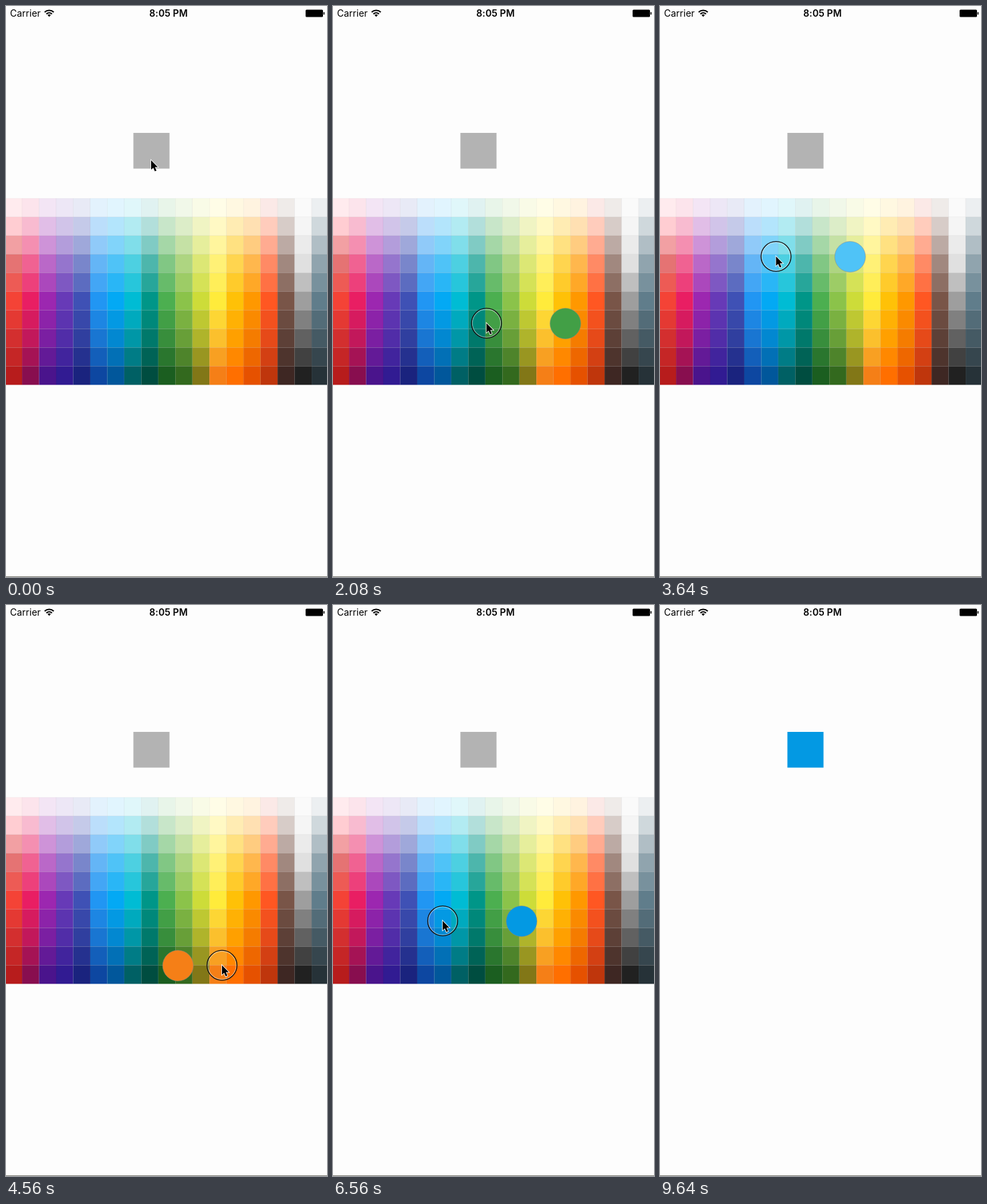
An HTML page for the animation above (9.76 s loop, 480x855 px).

```html
<!DOCTYPE html>
<html lang="en">
<head>
<meta charset="utf-8">
<title>Color picker</title>
<style>
  html, body { margin: 0; width: 100%; height: 100%; overflow: hidden; background: #fdfdfd; }
  svg { display: block; width: 100vw; height: 100vh; }
  text { font: 14px Inter, "Liberation Sans", sans-serif; }
  .clock { font-weight: 600; letter-spacing: .1px; }
</style>
</head>
<body>
<svg viewBox="0 0 480 855">
  <rect width="480" height="855" fill="#fdfdfd"/>
  <rect y="854" width="480" height="1" fill="#808078"/>
  <text x="6" y="16">Carrier</text>
  <text x="243" y="16" text-anchor="middle" class="clock">8:05 PM</text>
  <g fill="none" stroke="#000" stroke-width="2">
    <path d="M57.8 9.2a10 10 0 0 1 13.6 0M60.4 12a6.2 6.2 0 0 1 8.4 0"/>
    <path d="M64.6 16.2l-2.4-2.6a3.6 3.6 0 0 1 4.8 0z" fill="#000" stroke="none"/>
  </g>
  <rect x="448" y="5.5" width="26" height="11" rx="1.5"/>
  <rect x="474.7" y="9" width="1.6" height="4" rx=".8"/>
  <rect id="swatch" x="190.5" y="190" width="54" height="53.5"/>
  <g id="picker">
    <g id="cells" stroke="#000" stroke-opacity=".05" stroke-width=".6"></g>
    <g id="ring" fill="none">
      <circle r="21.2" stroke="#fff" stroke-opacity=".5" stroke-width="1.2"/>
      <circle r="22.4" stroke="#111" stroke-width="1.4"/>
    </g>
    <circle id="preview" r="23" stroke="#888" stroke-opacity=".5" stroke-width="1"/>
  </g>
  <path id="cursor" d="M0 0V14L3.2 11.2L5.6 16.6L8 15.6L5.7 10.2H10Z" stroke="#fff" stroke-width="1.6" paint-order="stroke"/>
</svg>
<script>
const LOOP = 9760;
const GRID = { x: -1.4, y: 288, w: 25.47, h: 27.93, rows: 10 };
const STOP_ROWS = [0, 1, 3, 5, 7, 9];
// Material hues, one column per line: shades 50, 100, 300, 500, 700, 900.
const COLUMNS = `
ffebee ffcdd2 e57373 f44336 d32f2f b71c1c
fce4ec f8bbd0 f06292 e91e63 c2185b 880e4f
f3e5f5 e1bee7 ba68c8 9c27b0 7b1fa2 4a148c
ede7f6 d1c4e9 9575cd 673ab7 512da8 311b92
e8eaf6 c5cae9 7986cb 3f51b5 303f9f 1a237e
e3f2fd bbdefb 64b5f6 2196f3 1976d2 0d47a1
e1f5fe b3e5fc 4fc3f7 03a9f4 0288d1 01579b
e0f7fa b2ebf2 4dd0e1 00bcd4 0097a7 006064
e0f2f1 b2dfdb 4db6ac 009688 00796b 004d40
e8f5e9 c8e6c9 81c784 4caf50 388e3c 1b5e20
f1f8e9 dcedc8 aed581 8bc34a 689f38 33691e
f9fbe7 f0f4c3 dce775 cddc39 afb42b 827717
fffde7 fff9c4 fff176 ffeb3b fbc02d f57f17
fff8e1 ffecb3 ffd54f ffc107 ffa000 ff6f00
fff3e0 ffe0b2 ffb74d ff9800 f57c00 e65100
fbe9e7 ffccbc ff8a65 ff5722 e64a19 bf360c
efebe9 d7ccc8 a1887f 795548 5d4037 3e2723
fafafa f5f5f5 e0e0e0 9e9e9e 616161 212121
eceff1 cfd8dc 90a4ae 607d8b 455a64 263238`.trim().split("\n").map(line => line.split(" "));

// Keys are [time, x, y]; motion eases between them.
const CURSOR = [
  [40, 217, 231], [640, 211, 330], [1300, 215, 425], [2080, 229.5, 475],
  [2700, 340, 420], [3640, 173.5, 375], [4250, 185, 548], [4560, 323, 539.5],
  [5680, 174.5, 484], [6300, 164, 473], [8900, 164, 473], [9160, 150, -22]
];
const SHOW_RING = 640, FADE_START = 6800, FADE_END = 7060;
const PREVIEW_GAP = 118, MIDDLE = 240, SIDE_LAG = 120;

const $ = id => document.getElementById(id);
const clamp = (v, lo, hi) => Math.min(hi, Math.max(lo, v));
const mix = (a, b, k) => a + (b - a) * k;

function cursorAt(t) {
  const next = CURSOR.findIndex(key => key[0] > t);
  if (next === 0) return CURSOR[0].slice(1);
  if (next < 0) return CURSOR[CURSOR.length - 1].slice(1);
  const a = CURSOR[next - 1], b = CURSOR[next];
  const k = (t - a[0]) / (b[0] - a[0]);
  const eased = k * k * (3 - 2 * k);
  return [mix(a[1], b[1], eased), mix(a[2], b[2], eased)];
}

// The preview sits on the roomier side and glides across when that changes.
function previewOffset(t) {
  let sum = 0, total = 0;
  for (let ago = 0; ago < SIDE_LAG * 6; ago += 10) {
    const weight = Math.exp(-ago / SIDE_LAG);
    sum += weight * (cursorAt(t - ago)[0] < MIDDLE ? 1 : -1);
    total += weight;
  }
  return PREVIEW_GAP * sum / total;
}

function cellColor(col, row) {
  const upper = STOP_ROWS.findIndex(stop => stop >= row);
  const lower = STOP_ROWS[upper] === row ? upper : upper - 1;
  const channel = (stop, n) => parseInt(COLUMNS[col][stop].slice(n * 2, n * 2 + 2), 16);
  const rgb = [0, 1, 2].map(n => Math.round(mix(channel(lower, n), channel(upper, n), 0.5)));
  return `rgb(${rgb})`;
}

function colorAt(x, y) {
  const col = clamp(Math.floor((x - GRID.x) / GRID.w), 0, COLUMNS.length - 1);
  const row = clamp(Math.floor((y - GRID.y) / GRID.h), 0, GRID.rows - 1);
  return cellColor(col, row);
}

function buildCells() {
  COLUMNS.forEach((_, col) => {
    for (let row = 0; row < GRID.rows; row++) {
      const rect = document.createElementNS("http://www.w3.org/2000/svg", "rect");
      const attrs = {
        x: GRID.x + col * GRID.w, y: GRID.y + row * GRID.h,
        width: GRID.w, height: GRID.h, fill: cellColor(col, row)
      };
      for (const name in attrs) rect.setAttribute(name, attrs[name]);
      $("cells").append(rect);
    }
  });
}

function place(id, x, y) {
  $(id).setAttribute("transform", `translate(${x} ${y})`);
}

const picked = colorAt(...cursorAt(FADE_START));

function render(t) {
  const [x, y] = cursorAt(t);
  const touching = t >= SHOW_RING && t < FADE_START;
  place("cursor", x, y);
  place("ring", x, y);
  place("preview", x + previewOffset(t), y + 0.5);
  $("preview").setAttribute("fill", colorAt(x, y));
  for (const id of ["ring", "preview"]) {
    $(id).setAttribute("visibility", touching ? "visible" : "hidden");
  }
  $("picker").setAttribute("opacity", clamp((FADE_END - t) / (FADE_END - FADE_START), 0, 1));
  $("swatch").setAttribute("fill", t < FADE_START ? "#b3b3b3" : picked);
}

buildCells();
const start = performance.now();
function tick() {
  render((performance.now() - start) % LOOP);
  requestAnimationFrame(tick);
}
tick();
</script>
</body>
</html>
```
